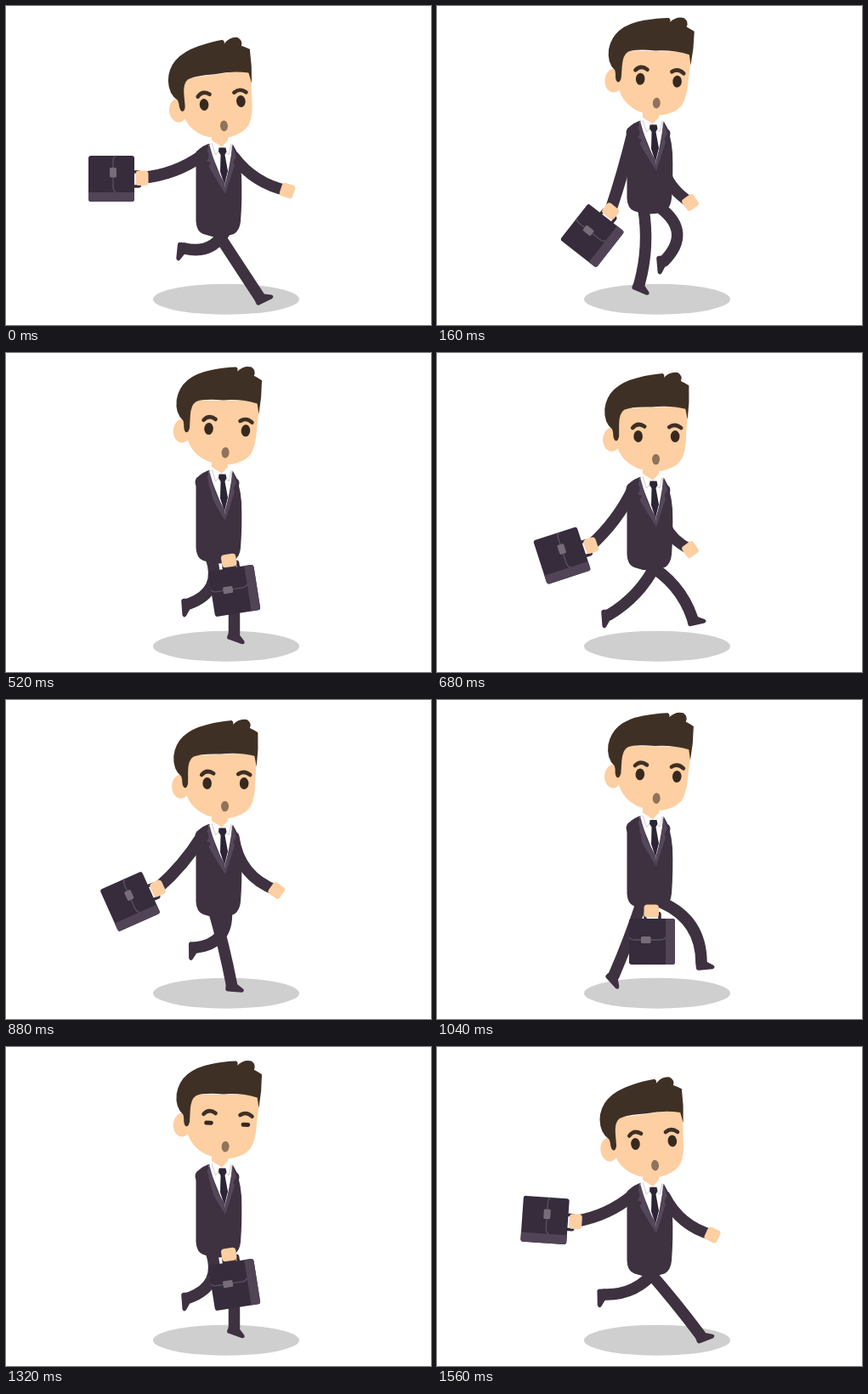
Animation of 500x375 px, one loop 1600 ms. Source, as an HTML page:

```html
<!DOCTYPE html>
<html lang="en">
<head>
<meta charset="utf-8">
<title>Walking businessman</title>
<style>
  html, body { margin: 0; width: 100%; height: 100%; overflow: hidden; background: #fff; }
  svg { display: block; width: 100%; height: 100%; }
  .suit { fill: #3e3140; }
  .limb { fill: none; stroke: #3e3140; stroke-linecap: round; }
  .lapel { fill: #54475a; }
  .skin { fill: #fdcfa2; }
  .hair { fill: #3f3025; }
  .brow { fill: none; stroke: #3f3025; stroke-width: 4.6; stroke-linecap: round; }
</style>
</head>
<body>
<svg viewBox="0 0 500 375">
  <ellipse cx="259" cy="344.7" rx="86" ry="18" fill="#cfcfcf"/>

  <path id="farArm" class="limb" stroke-width="13"/>
  <rect id="farHand" class="skin" x="-8" y="-8" width="16" height="16" rx="3.5"/>

  <path id="legB" class="limb" stroke-width="13.5"/>
  <path id="footB" class="suit" d="M-6.5-1V6Q-6 9-3 8.6L13 8Q17 6 14 3.5L6.5-1Z"/>
  <path id="legA" class="limb" stroke-width="13.5"/>
  <path id="footA" class="suit" d="M-6.5-1V6Q-6 9-3 8.6L13 8Q17 6 14 3.5L6.5-1Z"/>

  <g id="body">
    <path class="suit" d="M238 135Q225 140 223.500 148V226Q224 238 232 241Q250 248 268 241Q275 237 276 226Q278 200 277 172Q275 148 267 136Z"/>
    <path d="M238 137L243 132H262L267 137L258 187Z" fill="#fff"/>
    <path class="skin" d="M242 116H261V131L254 138.500L242 131Z"/>
    <path d="M242 134L246.500 148L254 139L262 148L265 135" fill="none" stroke="#d2ccd4"/>
    <path d="M250.500 139.500H258.500L259.500 144L257.500 148L261 167L257 183L252 168L252.500 148L250 144Z" fill="#2c2535"/>
    <path class="lapel" d="M239 135L233.500 154L241 157L238.500 162L258 194L257.500 182L247 163Z"/>
    <path class="lapel" d="M266 135.500L271 150L267.500 156L269 160L258 194L257.500 182L264 160Z"/>
  </g>

  <g id="head">
    <ellipse class="skin" cx="205.500" cy="102" rx="10.500" ry="14"/>
    <path class="skin" d="M210 66V100Q212 126 237 136Q250 140 262 139Q280 136 287 126Q293 116 293 96L295 62Z"/>
    <path class="hair" d="M206 90Q196 82 197 66Q200 38 236 29Q252 25 265 24Q268 26 266.500 29Q274 21 283 23Q289 27 286.500 33Q291 35 296 38Q297 58 294.500 78Q293 70 292 65.500Q274 61 252 63.500Q228 63 220 67Q214 71 214 84V98Q213 104 210 103.500Q207 102 207 94Z"/>
    <path class="brow" d="M230 88Q236 81 244 86.500M273 87Q280 82 287 88"/>
    <g id="eyes" fill="#38291f">
      <rect x="231.200" width="10.600"/>
      <rect x="274.700" width="10.600"/>
    </g>
    <ellipse cx="257.500" cy="125" rx="4.500" ry="6.300" fill="#8f735a"/>
  </g>

  <path id="nearArm" class="limb" stroke-width="14"/>
  <circle id="shoulder" class="suit" r="8"/>
  <g id="bag">
    <path d="M-7 10V4Q-7 2.500-5 2.500H8Q10 2.500 10 4V10" fill="none" stroke="#362c3b" stroke-width="3.500"/>
    <rect x="-26" y="9" width="54" height="54" rx="3" fill="#362c3b"/>
    <path d="M17 9H25Q28 9 28 12V60Q28 63 25 63H17Z" fill="#524457"/>
    <path d="M-26 31Q-24 34-20 34H11Q15 34 17 31" fill="none" stroke="#5d5064" stroke-width="1.300"/>
    <rect x="-12" y="30" width="11.500" height="8" rx="1.500" fill="#766d79"/>
    <rect class="skin" x="-8.500" y="-7.500" width="17.500" height="15" rx="4"/>
  </g>
</svg>
<script>
const LOOP = 1600, STRIDE = 800, STEP = 40, LEG_GAP = 19;
const el = id => document.getElementById(id);

// Keys: phase in ms, then values. Smooth periodic curve through them.
function track(period, keys) {
  const n = keys.length;
  const key = i => {
    const turn = Math.floor(i / n), k = keys[i - turn * n];
    return [k[0] + turn * period, ...k.slice(1)];
  };
  return time => {
    const p = (time % period + period) % period;
    let i = n - 1;
    while (keys[i][0] > p) i--;
    const a = key(i - 1), b = key(i), c = key(i + 1), d = key(i + 2);
    const h = c[0] - b[0], u = (p - b[0]) / h, v = 1 - u;
    return b.slice(1).map((y, j) => {
      j++;
      const m0 = (c[j] - a[j]) / (c[0] - a[0]) * h;
      const m1 = (d[j] - b[j]) / (d[0] - b[0]) * h;
      return (1 + 2 * u) * v * v * y + u * v * v * m0
        + u * u * (3 - 2 * u) * c[j] - u * u * v * m1;
    });
  };
}

const bob = track(STRIDE / 2, [
  [0, 27], [120, 3], [160, 0], [200, -2.5], [240, 1.5], [280, 11], [360, 25.2]
]);
// x, y, bend, angle
const nearHand = track(STRIDE, [
  [0, 160, 202, 10, 90], [160, 204, 241, 2, 38], [240, 252, 248, 0, 0],
  [360, 298, 232, -10, -64], [520, 262, 244, -3, -9],
  [680, 181, 226, 8, 72], [760, 163, 205, 10, 94]
]);
const farHand = track(STRIDE, [
  [0, 331, 217, -14, 18], [160, 298, 231, -32, 55], [240, 255, 230, -20, 75],
  [360, 216, 231, 0, 120], [520, 250, 230, -20, 75],
  [680, 298, 231, -32, 55], [760, 324, 221, -16, 25]
]);
const ankle = track(STRIDE, [
  [0, 298, 342, 0, -24], [120, 249.5, 330, 4, 22], [160, 238, 327, 10, 25],
  [240, 208, 324, 2, 50], [280, 183, 308, 12, 88], [360, 178, 291, 17, 91],
  [400, 191, 285, 20, 98], [520, 215, 295, 30, 88], [560, 248, 300, 36, 87],
  [640, 292, 309, 27, -3], [680, 300.5, 312, 16, -10], [760, 310, 339, 2, -19]
]);

const place = (id, x, y, angle = 0) =>
  el(id).setAttribute('transform', `translate(${x} ${y}) rotate(${angle})`);

function limb(id, x0, y0, x1, y1, bend) {
  const dx = x1 - x0, dy = y1 - y0, k = bend / Math.hypot(dx, dy);
  const cx = (x0 + x1) / 2 + dy * k, cy = (y0 + y1) / 2 - dx * k;
  el(id).setAttribute('d', `M${x0} ${y0}Q${cx} ${cy} ${x1} ${y1}`);
}

function leg(side, time, shift, drop) {
  const [x, y, bend, angle] = ankle(time);
  const hip = 243 + (x - 243) * 0.07;
  limb('leg' + side, hip + shift, 237 + drop, x + shift, y, bend);
  place('foot' + side, x + shift, y, angle);
}

function blink(time) {
  const open = Math.min(1, Math.abs(time - 1320) / 100);
  const half = 2.5 + 4.5 * open;
  for (const eye of el('eyes').children) {
    eye.setAttribute('y', 98 - half);
    eye.setAttribute('height', 2 * half);
    eye.setAttribute('rx', Math.min(5.3, half));
    eye.setAttribute('ry', half);
  }
}

function draw(time) {
  const [drop] = bob(time);
  place('body', 0, drop);
  el('head').setAttribute('transform',
    `translate(0 ${drop - 11}) rotate(${4 - drop * 0.344} 256 136)`);
  blink(time);

  leg('A', time, 0, drop);
  leg('B', time + STRIDE / 2, LEG_GAP, drop);

  const far = farHand(time), near = nearHand(time);
  limb('farArm', 268, 150 + drop, far[0], far[1], far[2]);
  place('farHand', far[0], far[1], far[3]);
  limb('nearArm', 230.5, 149 + drop, near[0], near[1], near[2]);
  place('shoulder', 230.5, 149 + drop);
  place('bag', near[0], near[1], near[3]);
}

let start;
function tick(now) {
  start ??= now;
  draw(Math.floor((now - start) % LOOP / STEP) * STEP);
  requestAnimationFrame(tick);
}
draw(0);
requestAnimationFrame(tick);
</script>
</body>
</html>
```
